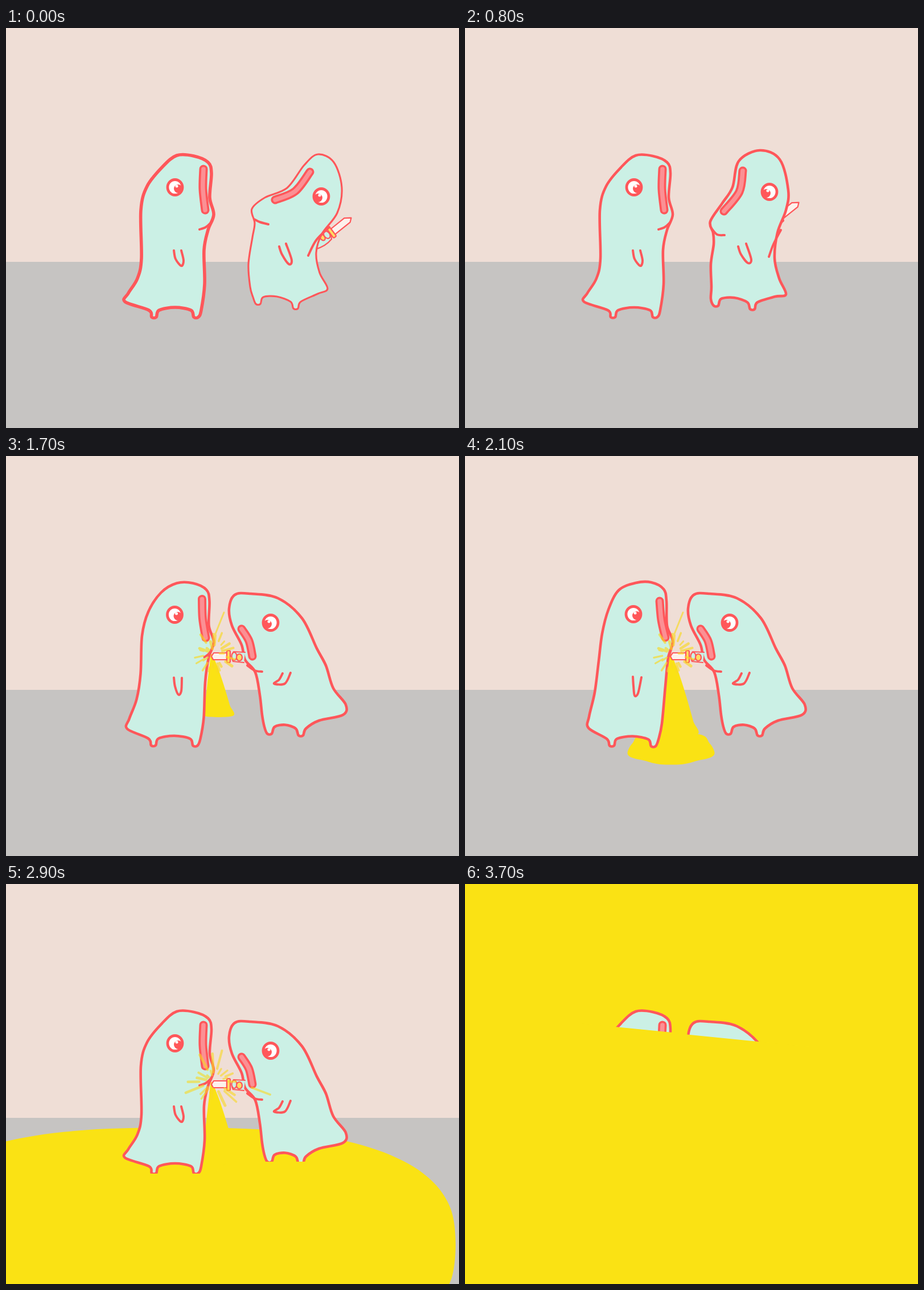
Animation of 796x703 px, one loop 3800 ms. Source, as an HTML page:

```html
<!DOCTYPE html>
<html lang="en">
<head>
<meta charset="utf-8">
<title>Two creatures</title>
<style>
html, body { margin: 0; width: 100%; height: 100%; overflow: hidden; background: #efded6; }
svg { display: block; width: 100vw; height: 100vh; }
.ink { stroke: #ff575a; stroke-linecap: round; stroke-linejoin: round; }
.skin { fill: #cbf0e5; }
.line { fill: none; stroke-width: 4; }
.lips { fill: none; stroke-width: 15; }
.tongue { fill: none; stroke: #fb9094; stroke-width: 7.5; stroke-linecap: round; }
.goo { fill: #fae214; }
.thin { stroke-width: 2.2; }
.steel { fill: #fdf1ec; }
.gold { fill: #ffdc62; }
.eye { fill: #fff; stroke-width: 4.8; }
.pupil { fill: #ff575a; }
.rays { stroke: #f9d923; stroke-linecap: round; }
</style>
</head>
<body>
<svg viewBox="0 0 796 703" preserveAspectRatio="none">
  <rect width="796" height="703" fill="#efded6"/>
  <rect y="411" width="796" height="292" fill="#c6c4c2"/>
  <path id="puddle" class="goo"/>
  <path id="flood" class="goo"/>
  <path id="stream" class="goo"/>
  <g id="backKnife" class="ink thin">
    <path class="skin" d="M-42-8L-8-8Q-2 0-8 9Q-24 13-42 6"/>
    <path class="steel" d="M2-6L32-7L42 0L36 5L2 6Z"/>
    <rect class="gold" x="-4" y="-11" width="6" height="21" rx="2"/>
    <ellipse class="gold" cx="-19" cy="-3" rx="4" ry="6"/>
    <ellipse class="skin" cx="-10" cy="-2" rx="5" ry="7"/>
  </g>
  <g id="right"></g>
  <g id="left"></g>
  <g id="frontKnife" class="ink thin">
    <path class="skin" d="M420 345L400 344Q394 352 399 361L418 363"/>
    <path class="steel" d="M361 352L365 346H388V358H364Z"/>
    <rect class="gold" x="388" y="342" width="6" height="21" rx="2"/>
    <ellipse class="skin" cx="401" cy="352" rx="4.5" ry="7"/>
    <ellipse class="gold" cx="410" cy="354" rx="5" ry="6"/>
  </g>
  <g id="burst" class="rays" opacity=".65"></g>
  <g id="spray" class="rays" opacity=".6"></g>
  <path id="water" class="goo"/>
</svg>
<script>
const $ = id => document.getElementById(id);
const pts = s => s.split(' ').map(p => p.split(',').map(Number));
const range = n => Array.from({ length: n }, (_, i) => i);
const ramp = (f, a, b) => Math.max(0, Math.min(1, (f - a) / (b - a)));
const mix = (a, b, u) => a + (b - a) * u;
const wave = u => Math.sin(Math.PI * u) ** 2;
const STEP = 100, FRAMES = 38;
const STAB = 13, POOL = 21, FLOOD = 30, WATER = 29;

// Key points per pose; "body" runs from the left foot over the head to the right foot.
const LEFT = [{
  body: '209,481 215,466 231,440 238,405 237,320 248,278 275,244 300,224 330,225 355,236 361,255 358,298 365,328 355,355 348,390 349,450',
  feet: '334,510 260,510', mouth: '347,248 346,283 350,320',
  arm: '295,391 298,406 308,418 312,409 308,391', fold: '340,354 351,350 361,341', eye: '297,280'
}, {
  body: '217,478 218,458 228,415 235,360 241,312 252,270 270,236 300,223 327,222 349,234 354,255 355,298 365,326 357,355 352,405 346,470',
  feet: '331,512 258,511', mouth: '342,255 345,288 352,319',
  arm: '295,388 296,404 298,421 304,417 310,389', fold: '357,353 360,347 362,340', eye: '296,278'
}];
const RIGHT = [{
  body: '429,455 426,415 433,368 437,343 432,318 455,298 494,281 524,241 548,222 576,236 590,280 582,325 555,362 545,395 551,430 565,458 548,467',
  feet: '509,495 443,487', mouth: '534,253 508,287 473,302',
  arm: '480,384 485,398 497,415 502,408 492,379', fold: '436,336 446,341 461,345', crease: '568,350 545,373 531,400', eye: '554,296'
}, {
  body: '433,455 432,415 437,380 436,360 431,340 452,308 470,280 481,234 518,215 553,231 568,285 564,320 549,360 544,405 552,440 564,468 545,472',
  feet: '505,496 441,490', mouth: '488,251 482,288 455,322',
  arm: '480,384 485,398 497,413 503,407 494,379', fold: '433,352 443,363 456,364', crease: '555,355 542,380 534,402', eye: '535,288'
}, {
  body: '450,455 446,420 438,380 420,358 414,332 397,298 392,268 402,244 430,242 478,250 520,285 546,338 562,368 575,408 597,437 592,455 550,465',
  feet: '518,493 463,490', mouth: '414,304 427,325 433,352',
  arm: '486,382 480,393 471,400 490,400 500,381', fold: '424,368 437,377 450,379', crease: '546,338 554,353 562,368', eye: '465,293'
}];

const blend = (poses, w) => poses[0].map((p, i) =>
  p.map((_, k) => poses.reduce((sum, q, j) => sum + q[i][k] * w[j], 0)));

// Smooth curve through points
function curve(p, closed) {
  const n = p.length;
  const get = i => closed ? p[(i + n) % n] : p[Math.max(0, Math.min(n - 1, i))];
  let d = 'M' + p[0];
  for (let i = 0; i < (closed ? n : n - 1); i++) {
    const [a, b, c, e] = [get(i - 1), get(i), get(i + 1), get(i + 2)];
    const c1 = b.map((v, k) => v + (c[k] - a[k]) / 6);
    const c2 = c.map((v, k) => v - (e[k] - b[k]) / 6);
    d += `C${c1} ${c2} ${c}`;
  }
  return d + (closed ? 'Z' : '');
}

function add(parent, tag, attrs) {
  const el = document.createElementNS('http://www.w3.org/2000/svg', tag);
  set(el, attrs);
  parent.appendChild(el);
  return el;
}
function set(el, attrs) {
  for (const k in attrs) el.setAttribute(k, attrs[k]);
}
const show = (id, on) => set($(id), { visibility: on ? 'visible' : 'hidden' });

const foot = ([x, y]) => [[x + 9, y - 14], [x + 4, y - 2], [x - 4, y - 2], [x - 9, y - 14]];

function outline(body, [r, l]) {
  const belly = [(r[0] + l[0]) / 2, (r[1] + l[1]) / 2 - 19];
  return [...foot(r), belly, ...foot(l), ...body];
}

function creature(id, poses, look) {
  const g = $(id), parsed = {};
  for (const part in poses[0]) parsed[part] = poses.map(p => pts(p[part]));
  const path = cls => add(g, 'path', { class: cls });
  const body = path('ink skin'), lips = path('ink lips'), tongue = path('tongue');
  const lines = ['arm', 'fold', 'crease'].filter(k => parsed[k]).map(k => [k, path('ink line')]);
  const eye = add(g, 'g', {});
  add(eye, 'ellipse', { class: 'ink eye', rx: 13, ry: 13.5 });
  add(eye, 'circle', { class: 'pupil', cx: look * 5.5, cy: 2.5, r: 7.5 });
  add(eye, 'circle', { fill: '#fff', cx: look * 3, cy: -2, r: 2.5 });

  return (w, weight) => {
    const part = k => blend(parsed[k], w);
    set(body, { d: curve(outline(part('body'), part('feet')), true), 'stroke-width': weight });
    const mouth = curve(part('mouth'));
    set(lips, { d: mouth });
    set(tongue, { d: mouth });
    for (const [k, el] of lines) set(el, { d: curve(part(k)) });
    set(eye, { transform: `translate(${part('eye')[0]})` });
  };
}

function rays(id, seed, count, spread) {
  const rnd = () => (seed = seed * 16807 % 2147483647) / 2147483647;
  for (const i of range(count)) {
    const a = (i + rnd()) / count * Math.PI * 2;
    const near = 8 + rnd() * 18, far = near + 5 + rnd() * spread;
    const [x1, x2] = [near, far].map(r => 365 + r * Math.cos(a));
    const [y1, y2] = [near, far].map(r => 347 + r * Math.sin(a));
    add($(id), 'line', { x1, y1, x2, y2, 'stroke-width': 3 + rnd() * 2 });
  }
}
rays('burst', 77, 24, 16);
add($('burst'), 'line', { x1: 367, y1: 315, x2: 383, y2: 275, 'stroke-width': 3 });
rays('spray', 4242, 22, 28);
add($('spray'), 'line', { x1: 432, y1: 358, x2: 464, y2: 370, 'stroke-width': 4 });

const poseLeft = creature('left', LEFT, 1);
const poseRight = creature('right', RIGHT, -1);

// A falling strand that widens on its way down
function stream(f) {
  const top = 348, end = mix(390, 490, ramp(f, STAB, 19));
  const side = (u, wide) => [361 + wide * u ** .8, top + 140 * u];
  const us = range(7).map(i => i / 6 * (end - top) / 140);
  return curve([...us.map(u => side(u, 46)), ...us.slice(1).reverse().map(u => side(u, -16))], true);
}

// A rounded, slightly lobed blob that grows ever faster
function puddle(f) {
  const grow = ramp(f, POOL, WATER) ** 2, size = ramp(f, 18, POOL);
  const cx = mix(362, 300, grow), cy = mix(514, 634, grow);
  const rx = size * mix(74, 490, grow), ry = size * mix(27, 206, grow);
  const soft = v => Math.sign(v) * Math.abs(v) ** (2 / 2.6);
  return curve(range(40).map(i => {
    const a = i / 40 * Math.PI * 2, lobe = 1 + .06 * (1 - grow) * Math.sin(5 * a);
    return [cx + rx * lobe * soft(Math.cos(a)), cy + ry * lobe * soft(Math.sin(a))];
  }), true);
}

function flood(f) {
  const n = f - FLOOD, rise = 98 - 4 * n - 9.6 * n * n;
  const level = x => 300 + rise + 36 / (1 + Math.exp((300 - x) / 35));
  return curve(range(21).map(i => [i * 40, level(i * 40)])) + 'V703H0Z';
}

// The surface in front of both creatures
function water(f) {
  const m = f - WATER, tilt = .1 * Math.max(0, m / 4 - 1);
  const left = x => 509 - 17 * m - 1.85 * m * m + tilt * (x - 300);
  const right = x => 488 - 10.4 * m - 2.1 * m * m + tilt * (x - 450);
  return `M200 ${left(200)}L365 ${left(365)}L390 ${right(390)}L610 ${right(610)}V703H200Z`;
}

function draw(f) {
  const sway = f < STAB ? wave(f / 8) : f < WATER ? wave((f - STAB) * 3 / 16) : 0;
  poseLeft([1 - sway, sway], f < 7 ? 5.6 : 4.6);

  // Chat, lean back, then lunge
  const talk = f < 8 ? wave(f * 3 / 16) : 1 - 1.4 * ramp(f, 8, 11);
  const lunge = ramp(f, 11, STAB);
  const w = [(1 - talk) * (1 - lunge), talk * (1 - lunge), lunge];
  poseRight(w, 4.6 - 1.4 * Math.min(1, w[0]));

  set($('backKnife'), { transform: `translate(${573 - 20 * talk} ${359 - 27 * talk}) rotate(-37)` });
  set($('frontKnife'), { transform: `translate(${90 * (1 - lunge)} 0)` });
  show('backKnife', f < 12);
  show('frontKnife', f >= 12 && f < 33);
  show('burst', f >= STAB && f < 25);
  show('spray', f >= 25 && f < 36);

  const goo = { stream: [STAB, stream], puddle: [19, puddle], flood: [FLOOD, flood], water: [28, water] };
  for (const id in goo) {
    const [from, shape] = goo[id];
    show(id, f >= from);
    if (f >= from) set($(id), { d: shape(f) });
  }
}

const start = performance.now();
let last = -1;
function tick() {
  const f = Math.floor((performance.now() - start) / STEP) % FRAMES;
  if (f !== last) draw(last = f);
  requestAnimationFrame(tick);
}
tick();
</script>
</body>
</html>
```
